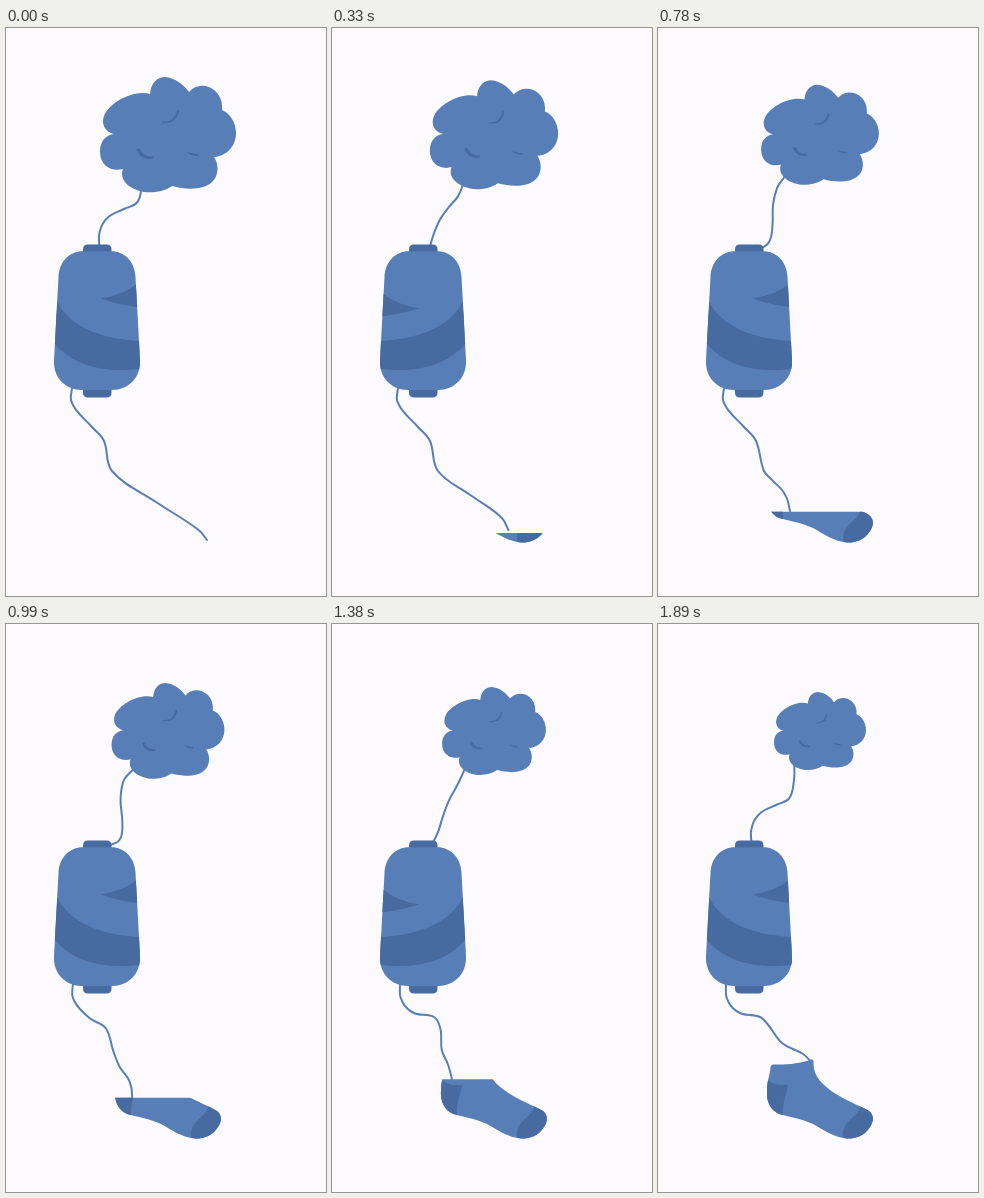
An HTML page with a canvas for the animation above (2.7 s loop, 320 by 568 pixels).

```html
<!DOCTYPE html>
<html lang="en">
<head>
<meta charset="utf-8">
<title>Knitting a sock</title>
<style>
html, body { margin: 0; width: 100%; height: 100%; overflow: hidden; background: #fcfafd; }
canvas { display: block; width: 320px; height: 568px; }
</style>
</head>
<body>
<canvas id="stage"></canvas>
<script>
const W = 320, H = 568;
const LOOP = 2700, STEP = 30, ACTIVE = 1890;
const BG = '#fcfafd', BLUE = '#587eb8', DARK = '#476aa0';

const canvas = document.getElementById('stage');
const ctx = canvas.getContext('2d');
const dpr = window.devicePixelRatio || 1;
canvas.width = W * dpr;
canvas.height = H * dpr;

const shape = d => new Path2D(d);

// Wool ball and its creases
const ball = shape('M144 66C145 54 152 49 159 49C169 50 177 56 183 64C188 58 196 56.5 203 59C212 63 217 71 216 82C224 85 230 95 230 105C230 118 221 128 208 129C213 136 213 148 206 154C198 162 180 162 166 158C158 164 146 165 138 164C122 161 113 151 117 141C107 144 94 139 94 123.500C94 113 100 107 108 106C99 104 95 96 98 88C103 74 129 61 144 66Z');
const creases = shape('M156 93.5Q168 95 171.500 81.5Q173 81 173 83Q170 97 156 94.700ZM131 121.5C132 119 134 121 135 123C138 128 142 128.5 147 128.5C148 129.5 147 130.8 144 131C136 131 131.5 126 131 121.5ZM181 124Q187 126 192.5 126.2Q194 127.5 191 128Q185 128 181 124Z');

// Spool
const spool = shape('M77 223.3H105C119 223.3 128.8 234 129.5 249L134 332C135 350 122 362 106 362H76C60 362 47 350 48 332L52.5 249C53.2 234 63 223.3 77 223.3Z');
const caps = shape('M77 224V221.5Q77 216.5 82 216.5H100.5Q105.5 216.5 105.5 221.5V224ZM77 362H105.5V364.5Q105.5 369.5 100.5 369.5H82Q77 369.5 77 364.5Z');
const band = shape('M51 273C62 296 90 311 135 313V341C100 345 68 339 48 315Z');
const wedgeRight = shape('M95 270.5Q117 267 131 256L132 279Q112 277 95 270.5Z');
const wedgeLeft = shape('M50 265Q65 277 87 280.5Q70 286 49 288.5Z');

// Sock
const sock = shape('M112.5 443Q113 440 116 440.5C128 441 143 439.5 153 435.5Q156 435 155.5 439C155 452 165 462 178 470C193 479 205 483 211 487C216 491 216 497 212 503C206 513 195 515 189 514.5C176 513.5 166 506 155 500C143 495 135 493.500 125 491C114 489 108 479 109 467C109 456 112 451 112.5 443Z');
const heel = shape('M105 452L110 456C117 462 124 461 130 461C129 470 124 478 125 492H105Z');
const toe = shape('M203 480C201 490 194 493 189 499C185 504 184 508 186 518H220V480Z');

// Upper thread: swings from slack to taut and back
const slack = [[93.5, 220], [94.5, 201], [103, 188.5], [118, 181], [131, 174.5], [135.5, 160], [136, 135]];
const taut = [[105, 221], [115.6, 214.5], [117, 198], [114.4, 176], [116.5, 157], [123.5, 148], [136, 139]];

// Lower thread: key poses, each starting at the spool
const loose = [[66, 360], [67, 377], [86, 399], [98, 413], [106, 443]];
const bent = [[68, 360], [70.5, 378], [82, 389], [102, 393]];
const poses = [
  { at: 0, pts: [...loose, [150, 474], [190, 500], [201, 512]] },
  { at: 810, pts: [...loose, [115, 453], [126, 465], [132, 484]] },
  { at: 1200, pts: [...bent, [109, 407], [112.5, 431], [119.5, 446], [119, 464]] },
  { at: 1560, pts: [...bent, [108, 403], [107, 421], [112.5, 435], [121, 447]] },
  { at: ACTIVE, pts: [...bent, [111, 402], [124, 419], [145, 430], [153, 438]] }
];

const ease = k => (1 - Math.cos(Math.PI * k)) / 2;
const blend = (a, b, k) => a.map(([x, y], i) => [x + (b[i][0] - x) * k, y + (b[i][1] - y) * k]);

function fill(path, color) {
  ctx.fillStyle = color;
  ctx.fill(path);
}

// Bezier handle of point i, reaching towards its neighbour j
function handle(p, i, j) {
  const before = p[i - 1], after = p[i + 1];
  if (!before || !after) return handle(p, j, i);
  const dx = after[0] - before[0], dy = after[1] - before[1];
  const chord = Math.hypot(p[j][0] - p[i][0], p[j][1] - p[i][1]);
  const k = (j - i) * 0.36 * chord / Math.hypot(dx, dy);
  return [p[i][0] + dx * k, p[i][1] + dy * k];
}

function thread(p) {
  ctx.beginPath();
  ctx.moveTo(...p[0]);
  for (let i = 1; i < p.length; i++) {
    ctx.bezierCurveTo(...handle(p, i - 1, i), ...handle(p, i, i - 1), ...p[i]);
  }
  ctx.strokeStyle = BLUE;
  ctx.lineWidth = 2;
  ctx.lineCap = ctx.lineJoin = 'round';
  ctx.stroke();
}

function clipped(path, draw) {
  ctx.save();
  ctx.clip(path);
  draw();
  ctx.restore();
}

function lowerPose(t) {
  const i = Math.max(1, poses.findIndex(p => p.at >= t));
  const a = poses[i - 1], b = poses[i];
  return blend(a.pts, b.pts, ease((t - a.at) / (b.at - a.at)));
}

function drawBall(t) {
  const s = 1 - 0.324 * t / ACTIVE;
  ctx.save();
  ctx.translate(162, 107.8);
  ctx.scale(s, s);
  ctx.translate(-162, -107.8);
  fill(ball, BLUE);
  fill(creases, DARK);
  ctx.restore();
}

function drawSpool(t) {
  const turned = Math.floor((t + 110) / 440) % 2 === 1;
  fill(caps, DARK);
  fill(spool, BLUE);
  clipped(spool, () => {
    fill(turned ? wedgeLeft : wedgeRight, DARK);
    if (turned) {
      ctx.translate(182, 0);
      ctx.scale(-1, 1);
    }
    fill(band, DARK);
  });
}

function drawSock(t) {
  const top = 520.6 - 0.0473 * t;
  const knitted = new Path2D();
  knitted.rect(0, top, W, H - top);
  clipped(knitted, () => {
    fill(sock, BLUE);
    clipped(sock, () => {
      fill(heel, DARK);
      fill(toe, DARK);
    });
  });
}

function draw(time) {
  const t = Math.min(Math.floor((time % LOOP) / STEP) * STEP, ACTIVE);
  const swing = 1 - Math.abs(1 - 2 * t / ACTIVE);
  ctx.setTransform(dpr, 0, 0, dpr, 0, 0);
  ctx.fillStyle = BG;
  ctx.fillRect(0, 0, W, H);
  thread(blend(slack, taut, swing));
  thread(lowerPose(t));
  drawBall(t);
  drawSpool(t);
  drawSock(t);
}

const start = performance.now();
function tick() {
  draw(performance.now() - start);
  requestAnimationFrame(tick);
}
tick();
</script>
</body>
</html>
```
